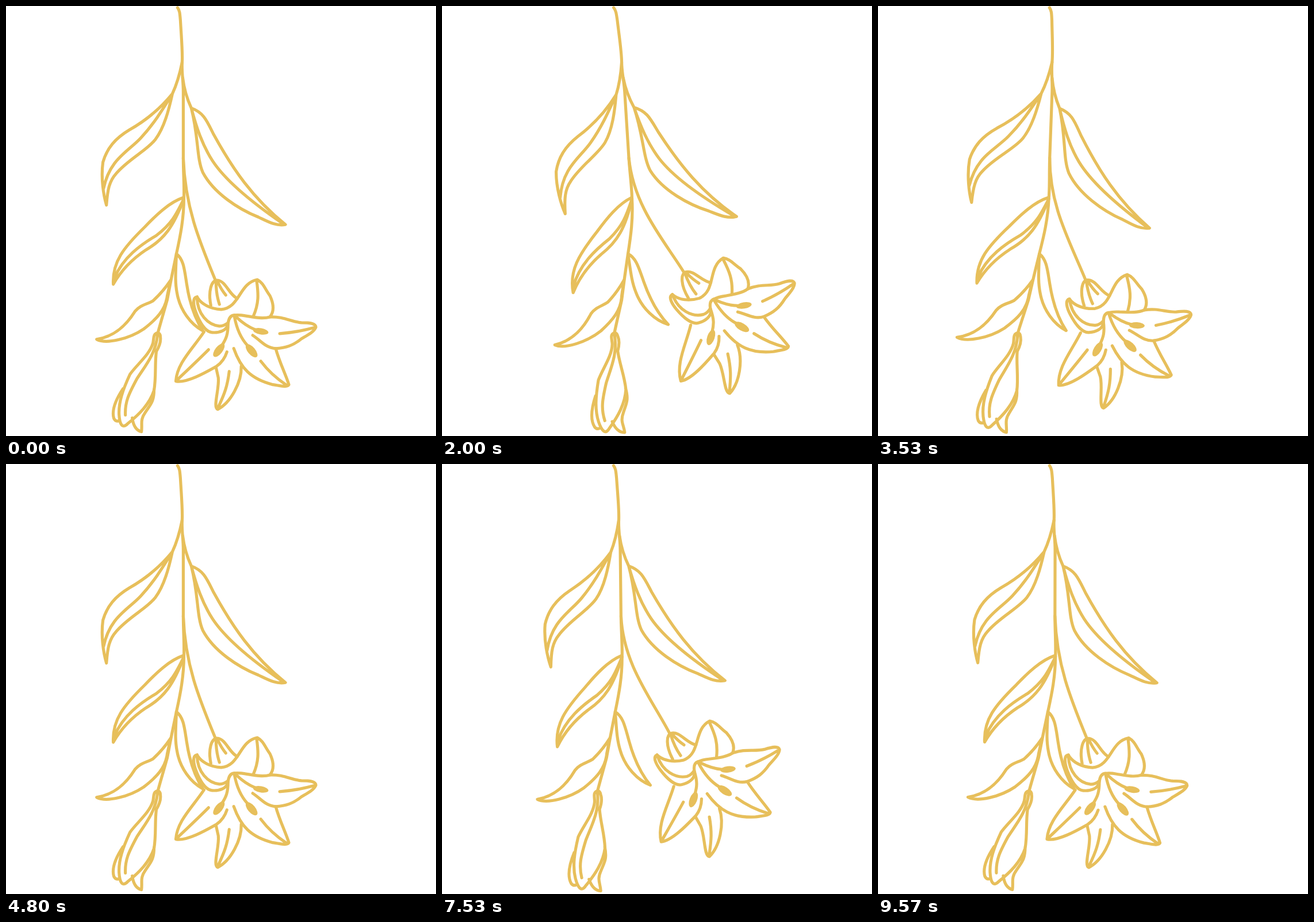
These frames come from a looping animation (748x748 px, 9610 ms). An HTML page:

```html
<!DOCTYPE html>
<html lang="en">
<head>
<meta charset="utf-8">
<title>Swaying lily</title>
<style>
  html, body { margin: 0; height: 100%; overflow: hidden; background: #fff; }
  svg { display: block; width: 100%; height: 100%; }
  path { fill: none; stroke: #e7bf5b; stroke-width: 5.2; stroke-linecap: round; stroke-linejoin: round; }
  ellipse { fill: #e7bf5b; }
</style>
</head>
<body>
<svg viewBox="0 0 749.5 749.5">
  <path id="stem" d="M299 3C303 8 303 14 304 25C306 60 308 80 307 98C306 115 309 130 309 150L309 265C309 290 311 315 310 335C310 370 304 400 297 432C291 460 286 485 281 512C276 530 270 550 264 572"/>
  <path id="stalk"/>
  <path id="leaf1" d="M307 98C303 118 297 138 290 153C268 180 245 199 215 216C190 231 176 248 169 272C165 300 170 330 175 347C177 320 180 305 192 292C212 268 245 252 260 233C276 212 284 180 290 153C272 182 258 205 235 230C213 254 181 266 170 318"/>
  <path id="leaf2" d="M308 125C311 150 317 165 323 178C345 186 350 200 362 224C395 284 430 335 487 381C470 384 455 375 440 368C405 354 362 326 343 290C332 265 336 230 323 178C332 212 342 242 360 270C383 305 428 342 482 379"/>
  <path id="leaf3" d="M309 334C285 342 262 364 242 385C205 421 185 446 187 485C200 462 220 441 244 425C275 407 292 385 310 336C296 365 288 380 262 400C235 416 204 438 189 474"/>
  <path id="leaf4" d="M297 432C310 442 311 460 315 485C320 518 328 543 343 566C322 555 303 530 298 500C294 480 296 460 297 432"/>
  <path id="leaf5" d="M287 478C277 493 266 505 256 514C246 520 234 521 225 532C210 556 190 576 158 581C175 590 215 580 240 563C262 546 278 530 281 505L285 487"/>
  <path id="bud" d="M264 570C256 571 258 580 256 588C250 608 228 625 216 642C204 668 196 690 197 712C198 728 202 738 212 728C232 712 250 694 258 670C262 645 259 625 262 602C268 592 270 584 269 577C269 572 267 570 264 570
    M264 574C261 606 242 628 228 650C214 676 207 690 208 713
    M204 667C190 688 184 706 188 719Q191 725 197 723
    M220 718C222 733 228 740 236 742C238 728 233 722 243 708C252 694 258 690 258 668"/>
  <g id="flower">
    <!-- base and curled upper petals -->
    <path d="M357 522C352 497 358 478 368 478C383 479 388 502 403 510M366 480Q366 502 372 520M369 481Q375 494 383 504"/>
    <path d="M333 507C340 520 357 528 375 529C408 526 406 483 438 477C449 483 451 493 460 505C467 520 468 532 460 542C447 546 430 542 417 540Q406 538 398 539M437 480C440 502 441 518 431 541"/>
    <path d="M333 507C324 508 327 523 331 534C337 550 347 568 359 569C371 570 386 566 387 553C388 546 391 539 398 539M333 507C333 537 352 556 372 558Q380 558 387 552"/>
    <!-- open petals with midribs -->
    <path d="M460 542C485 541 497 551 515 552C530 552 540 553 540 560C537 568 525 574 515 580C500 592 488 596 470 597C452 596 444 583 430 574M477 571Q506 569 536 561"/>
    <path d="M470 597C477 622 487 641 493 660C490 666 475 661 465 660C426 650 409 631 397 597M444 619Q462 643 489 661"/>
    <path d="M410 628C411 656 391 692 369 703C360 700 372 668 370 648L366 630M389 637C386 662 381 676 370 699"/>
    <path d="M345 568C326 597 298 622 296 654C315 658 351 637 367 628Q380 619 385 603M353 599C338 614 320 631 299 651"/>
    <!-- stamens -->
    <path d="M400 541Q418 558 434 564M398 541C402 563 410 580 421 592M387 553C387 572 384 580 376 592"/>
    <ellipse rx="13.5" ry="5.5" transform="translate(444 567) rotate(10)"/>
    <ellipse rx="14" ry="6.5" transform="translate(428 601) rotate(50)"/>
    <ellipse rx="14" ry="6.5" transform="translate(371 600) rotate(-52)"/>
  </g>
</svg>
<script>
const LOOP = 9610, PERIOD = 4800;
const el = id => document.getElementById(id);
const place = (id, value) => el(id).setAttribute('transform', value);

// id, pivot x and y, cosine and sine parts of the swing in degrees
const hanging = [
  ['leaf1', 307, 98, 2.7, -4.9],
  ['leaf2', 308, 130, 1.35, -3.5],
  ['leaf3', 310, 335, 2.9, -4.1],
  ['leaf4', 297, 432, 4.5, -4.6],
  ['leaf5', 286, 480, 1.55, -3.3],
  ['bud', 264, 571, 7, -4.75]
];

function draw(now) {
  const phase = (now % LOOP) / PERIOD * 2 * Math.PI;
  const sway = (a, b) => a * (Math.cos(phase) - 1) + b * Math.sin(phase);

  const lean = sway(-0.0185, 0.057);
  place('stem', `matrix(1 0 ${lean} 1 0 0)`);
  for (const [id, x, y, a, b] of hanging)
    place(id, `translate(${lean * y} 0) rotate(${sway(a, b)} ${x} ${y})`);

  const dx = sway(-23, 28.2), dy = sway(5.5, -6);
  place('flower', `translate(${dx} ${dy}) rotate(${sway(9.6, -3.5)} 365 478)`);
  el('stalk').setAttribute('d',
    `M${309 + lean * 265} 265C${312 + lean * 350} 350 ${337 + dx * 0.9} 410 ${365 + dx} ${478 + dy}`);
  requestAnimationFrame(draw);
}
draw(0);
</script>
</body>
</html>
```
